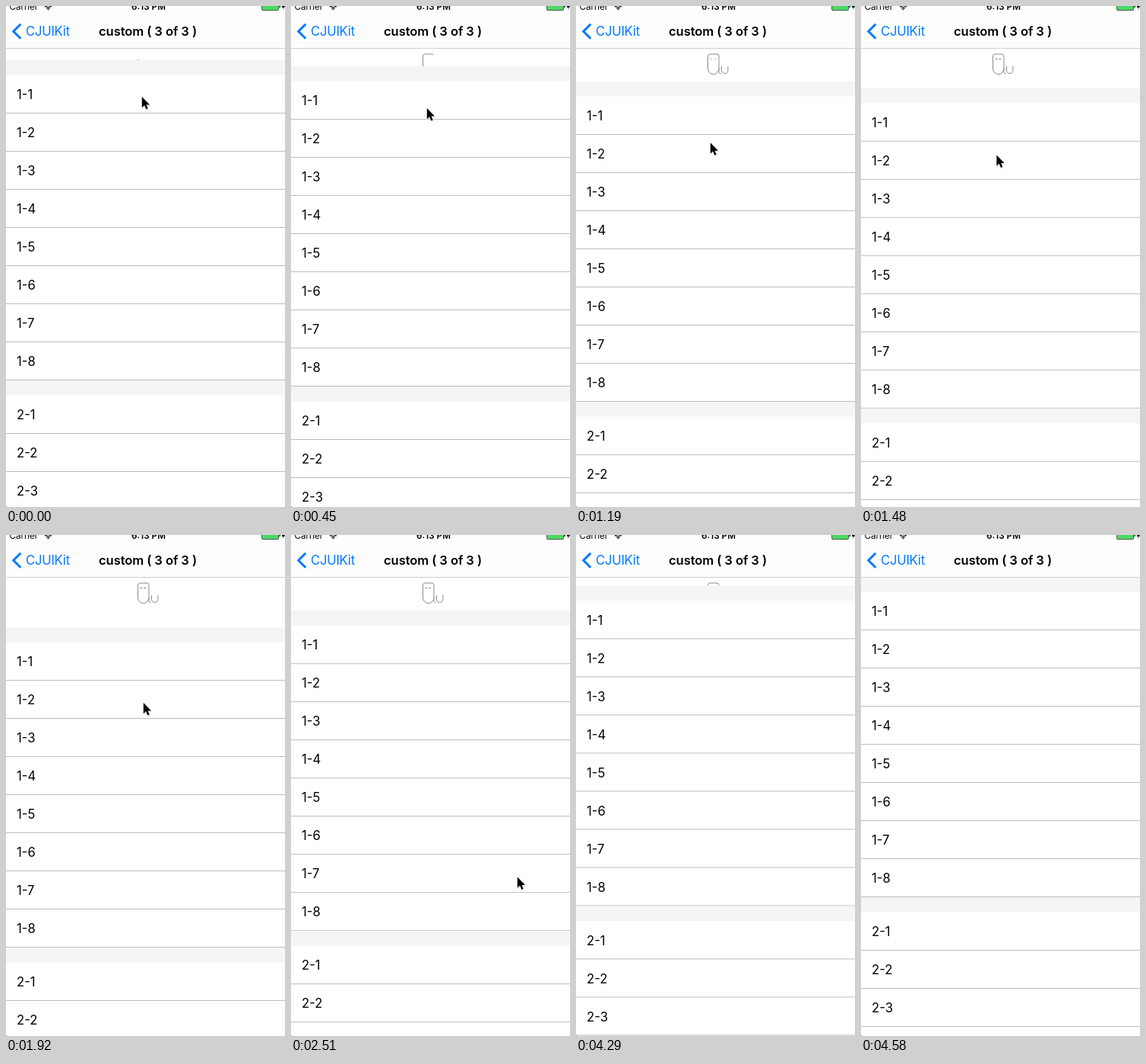
An HTML page for the animation above (5.59 s loop, 367x657 px).

```html
<!DOCTYPE html>
<html lang="en">
<head>
<meta charset="utf-8">
<title>Pull to refresh</title>
<style>
  html, body { margin: 0; width: 100%; height: 100%; overflow: hidden; background: #fff; }
  svg { display: block; width: 100vw; height: 100vh; font-family: Inter, "Liberation Sans", sans-serif; }
  .row { font-size: 16.7px; }
  .sketch { fill: none; stroke: #8a8a8a; stroke-width: 1; }
</style>
</head>
<body>
<svg viewBox="0 0 367 657">
  <rect width="367" height="657" fill="#fff"/>
  <path class="sketch" d="M188 82A7.25 7.5 0 0 1 173.5 82V66Q173.5 63 176.5 63H185Q188 63 188 66V83"/>
  <path class="sketch" d="M188 83Q187 88.5 190.5 88.8"/>
  <path class="sketch" d="M191.5 79V84.3A4.2 4.2 0 0 0 199.9 84.3V79"/>
  <path id="eyes" fill="none" stroke="#777"/>
  <g id="list"></g>

  <rect width="367" height="55" fill="#fdfdfd"/>
  <rect y="55" width="367" height="1" fill="#cfcfcf"/>
  <text x="4.5" y="5.4" font-size="11.7" letter-spacing="-.1">Carrier</text>
  <path d="M51.3 1.2Q55.5 -2.2 59.7 1.2M53.2 3Q55.5 1.2 57.8 3" fill="none" stroke="#000" stroke-width="1.3"/>
  <path d="M54 4L55.5 5.6L57 4Q55.5 3 54 4Z"/>
  <text x="187.5" y="5.4" font-size="11.7" font-weight="600" text-anchor="middle">6:13 PM</text>
  <rect x="336.5" y="-4" width="22" height="9.7" rx="1.5" fill="#4cd964" stroke="#333" stroke-width=".8"/>
  <path d="M359.5 -1V2.5Q361 2 361 0ZM363 0H367L364 5.5L365 2H363Z"/>
  <path d="M19.3 23.7L9.8 33.2L19.3 42.7" fill="none" stroke="#007aff" stroke-width="3"/>
  <text x="26" y="39" font-size="16.7" letter-spacing="-.25" fill="#007aff">CJUIKit</text>
  <text x="186.5" y="39" font-size="16.6" font-weight="600" letter-spacing="-.1" text-anchor="middle">custom ( 3 of 3 )</text>
  <rect y="656" width="1" height="1" fill="#777"/>
  <g id="cursor">
    <path d="M.5 1.5V16L4 13L6.3 18L8.8 17L6.7 12H11Z" fill="#000" opacity=".18"/>
    <path d="M0 0V14.2L3.3 11.2L5.5 16.4L7.9 15.4L5.8 10.4H10.2Z" stroke="#fff" stroke-width="1.6" paint-order="stroke"/>
  </g>
</svg>
<script>
const LOOP = 5590, STEP = 147.6;
const ROW = 50, HEADER = 19.5, SECTION = 420, ROWS = 8;
const NAV_BOTTOM = 55, REFRESH_TOP = 99.2, CLOSE_START = 25, CLOSE_END = 31;

// [step, list top]
const listKeys = [[0, 71], [3, 79], [8, 99], [13, 121], [14, 121], [15, 112], [16, 101], [17, REFRESH_TOP]];
// [step, x, y]
const cursorKeys = [[0, 178.8, 119], [3, 178.8, 134], [8, 176.8, 179.3], [13, 180.8, 220], [14, 180.8, 220],
  [15, 190, 236], [16, 246, 345], [17, 297.8, 448.5], [18, 297.8, 448.5], [19, 301, 540], [20, 299, 620]];
const CURSOR_GONE = 21;

const $ = id => document.getElementById(id);
const list = $("list"), cursor = $("cursor"), eyes = $("eyes");
const strokes = [...document.querySelectorAll(".sketch")].map(path => ({ path, length: path.getTotalLength() }));
const sketchLength = strokes.reduce((sum, s) => sum + s.length, 0);

function section(number) {
  const top = (number - 1) * SECTION;
  let out = `<rect y="${top}" width="367" height="${HEADER}" fill="#f5f5f5"/>`;
  for (let i = 1; i <= ROWS; i++) {
    const bottom = top + HEADER + i * ROW;
    out += `<text class="row" x="14" y="${bottom - 18.4}">${number}-${i}</text>` +
      `<rect y="${bottom - .5}" width="367" height="1" fill="#bdbdbd"/>`;
  }
  return out;
}
list.innerHTML = `<rect width="367" height="900" fill="#fff"/>` + section(1) + section(2);

function sample(keys, step) {
  const next = keys.findIndex(key => key[0] > step);
  if (next < 0) return keys[keys.length - 1].slice(1);
  const a = keys[next - 1], b = keys[next];
  const u = (step - a[0]) / (b[0] - a[0]);
  return a.slice(1).map((v, i) => v + (b[i + 1] - v) * u);
}

function listTop(step) {
  if (step < CLOSE_START) return sample(listKeys, step)[0];
  const u = Math.min(1, (step - CLOSE_START) / (CLOSE_END - CLOSE_START));
  return REFRESH_TOP + (NAV_BOTTOM - REFRESH_TOP) * u * u * (3 - 2 * u);
}

function drawSketch(progress) {
  let left = progress * sketchLength;
  for (const { path, length } of strokes) {
    const shown = Math.max(0, Math.min(length, left));
    path.style.display = shown ? "" : "none";
    path.setAttribute("stroke-dasharray", `${shown} ${length + 1}`);
    left -= length;
  }
}

function render(time) {
  // the screen refreshes in even steps
  const step = Math.floor((time % LOOP) / STEP);
  const top = listTop(step);
  list.setAttribute("transform", `translate(0 ${top})`);

  const progress = step >= CLOSE_START ? 1 : Math.min(1, (top - 57) / 42);
  drawSketch(progress);
  const dots = Math.floor((step - 13) / 2) & 1;
  eyes.setAttribute("d", dots ? "M177.5 69.8h1.3M182.5 69.8h1.3" : "M176.6 69.5h2.8M181.4 69.5h2.8");
  eyes.style.display = progress < 1 ? "none" : "";

  const [x, y] = sample(cursorKeys, step);
  cursor.setAttribute("transform", `translate(${x} ${y})`);
  cursor.style.display = step < CURSOR_GONE ? "" : "none";
}

const start = performance.now();
function tick() {
  render(performance.now() - start);
  requestAnimationFrame(tick);
}
tick();
</script>
</body>
</html>
```
